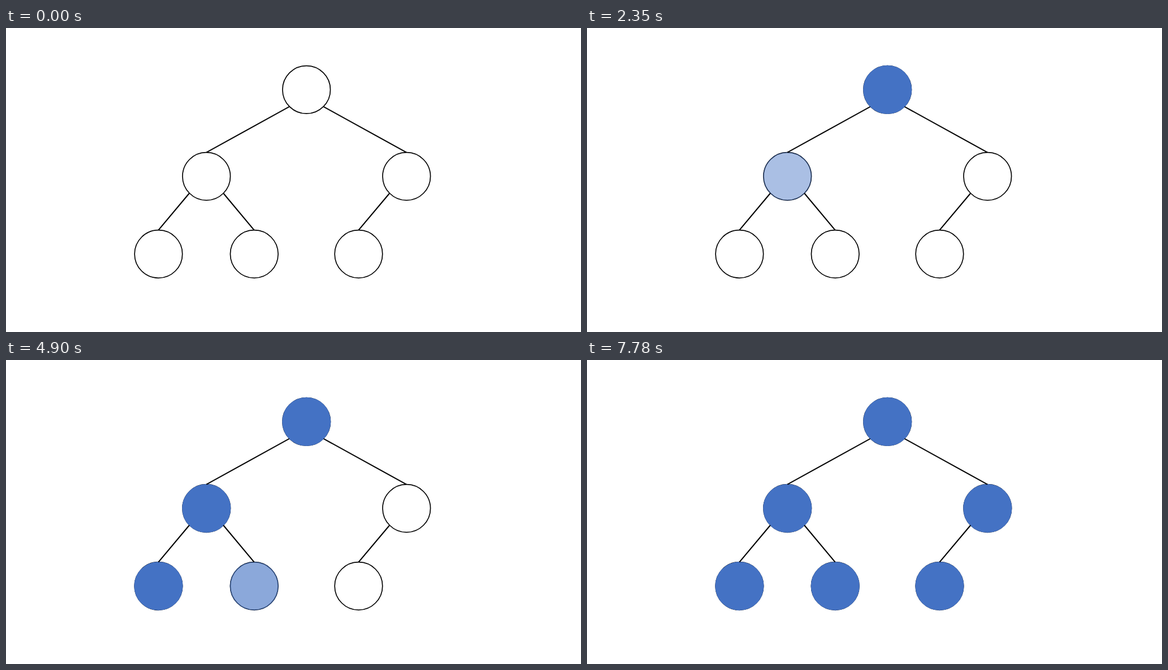
Animation of 1029 by 544 pixels, one loop 8.1 s. Source, as an HTML page:

```html
<!DOCTYPE html>
<html lang="en">
<head>
<meta charset="utf-8">
<title>Depth-first tree traversal</title>
<style>
  html, body { margin: 0; width: 100%; height: 100%; overflow: hidden; background: #fff; }
  svg { display: block; width: 100%; height: 100%; }
  .node { fill: #fff; stroke: #000; stroke-width: 1.7; }
  .fill { fill: #4472c4; }
  .edges { fill: none; stroke: #000; stroke-width: 2.2; }
</style>
</head>
<body>
<svg viewBox="0 0 1029 544">
  <g id="nodes"></g>
  <path class="edges" d="M506.8 140.9L358.7 222.6M568.4 140.9L716.6 222.6M328 295.8L272.8 361.6M389 295.8L444 361.6M686.4 295.8L631 361.6"/>
</svg>
<script>
const LOOP = 8100, STEP = 77, GAIN = 0.137;

// In visiting order: centre, time of the first visible step and its opacity
const nodes = [
  { x: 537.7, y: 110.4, start: 790, first: 0.04 },
  { x: 358.7, y: 265.5, start: 2120, first: 0.04 },
  { x: 272.9, y: 404.5, start: 3360, first: 0.04 },
  { x: 444.2, y: 404.5, start: 4670, first: 0.204 },
  { x: 716.8, y: 265.5, start: 5760, first: 0.022 },
  { x: 631, y: 404.5, start: 6920, first: 0.035 }
];

const group = document.getElementById('nodes');

function addCircle({ x, y }, r, className) {
  const circle = document.createElementNS('http://www.w3.org/2000/svg', 'circle');
  circle.setAttribute('cx', x);
  circle.setAttribute('cy', y);
  circle.setAttribute('r', r);
  circle.setAttribute('class', className);
  group.append(circle);
  return circle;
}

for (const node of nodes) {
  addCircle(node, 42.8, 'node');
  node.cover = addCircle(node, 43.6, 'fill');
}

function draw() {
  const t = performance.now() % LOOP;
  for (const { start, first, cover } of nodes) {
    const step = Math.floor((t - start + 2) / STEP);
    cover.setAttribute('opacity', step < 0 ? 0 : Math.min(1, first + step * GAIN));
  }
  requestAnimationFrame(draw);
}
draw();
</script>
</body>
</html>
```
